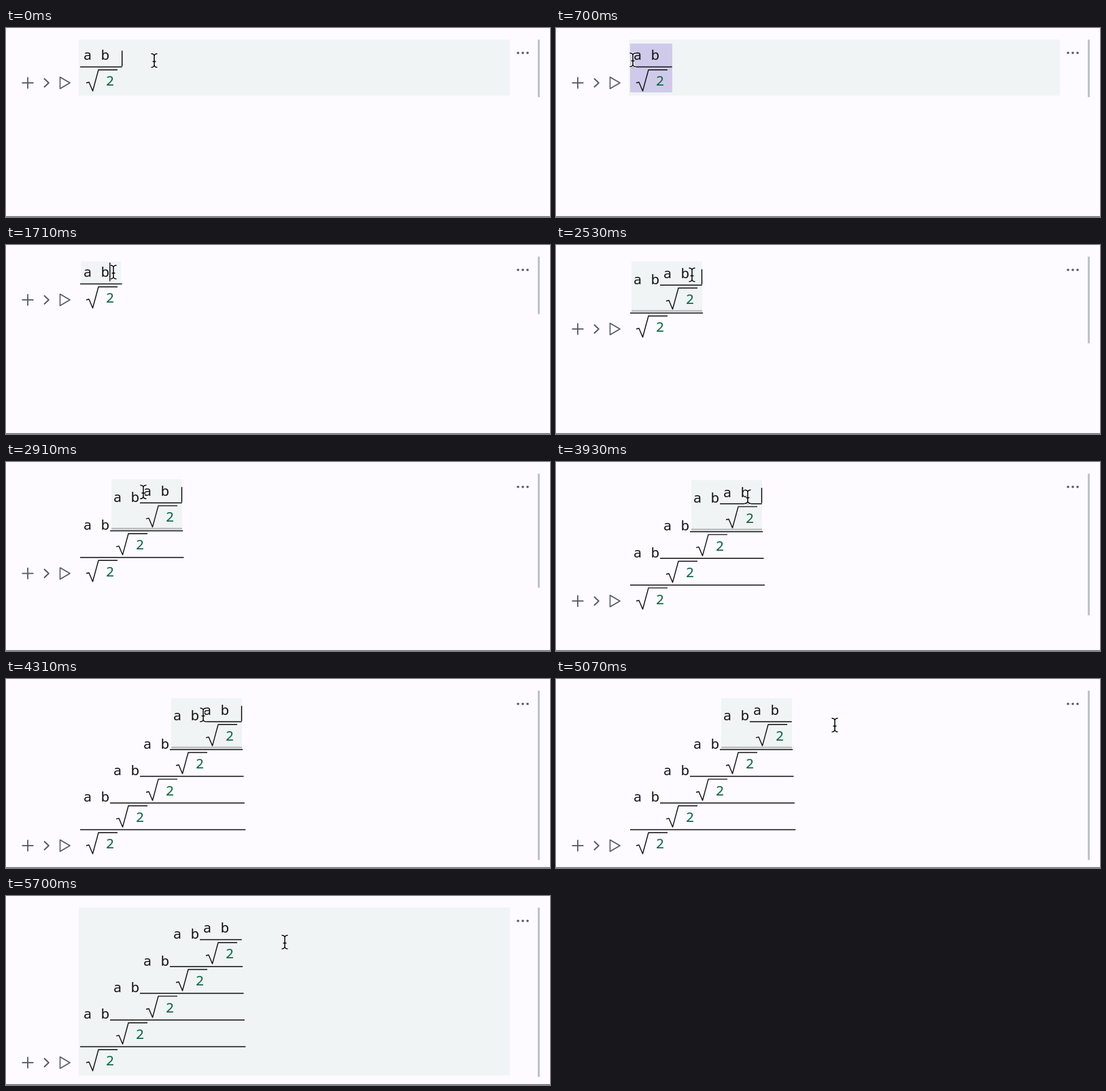
An HTML page with a canvas that plays this animation: 800 by 279 pixels, repeating every 5.82 s.

```html
<!DOCTYPE html>
<html lang="en">
<head>
<meta charset="utf-8">
<title>Nested fraction</title>
<style>
  html, body { margin: 0; width: 100%; height: 100%; overflow: hidden; background: #fdfbff; }
  canvas { display: block; width: 800px; height: 279px; }
</style>
</head>
<body>
<canvas id="stage"></canvas>
<script>
const LOOP = 5820, WIDTH = 800, HEIGHT = 279;
const LEFT = 109, INDENT = 44;
const INK = '#111', GREEN = '#0d6640', GREY = '#565b5d', CELL = '#f0f4f4';

const canvas = document.getElementById('stage');
const ctx = canvas.getContext('2d');
const scale = window.devicePixelRatio || 1;
canvas.width = WIDTH * scale;
canvas.height = HEIGHT * scale;

// [start, depth of nesting, focus]
const STATES = [
  [0, 1, 'cell'], [510, 1, 'selected'], [1270, 1, 'cell'], [1640, 1, 'slot'],
  [2030, 2, 'pasted'], [2690, 2, 'slot'], [2850, 3, 'pasted'], [3360, 3, 'slot'],
  [3550, 4, 'pasted'], [4060, 4, 'slot'], [4240, 5, 'pasted'], [5100, 5, 'cell'],
];

// Pointer path: [time, x, y]
const POINTER = [
  [0, 218, 48], [130, 218, 48], [680, 113, 47], [880, 113, 47], [1300, 164, 74],
  [1390, 162, 73], [1680, 158, 40], [2090, 158, 40], [2500, 200, 44], [2850, 200, 44],
  [3330, 243, 47], [3600, 243, 47], [4040, 289, 52], [4310, 290, 53], [4430, 290, 53],
  [4750, 410, 68], [LOOP, 410, 68],
];

const BOTTOM_BAR = [57.5, 100.5, 141, 181.7, 222.5];
const INNER_GAP = { cell: 39.8, selected: 39.8, slot: 40, pasted: 41.2 };

function rect(left, top, right, bottom, color) {
  ctx.fillStyle = color;
  ctx.fillRect(left, top, right - left, bottom - top);
}

function path(points, color, width, closed) {
  ctx.beginPath();
  points.forEach(([x, y]) => ctx.lineTo(x, y));
  if (closed) ctx.closePath();
  ctx.strokeStyle = color;
  ctx.lineWidth = width;
  ctx.stroke();
}

function glyph(char, x, baseline, color = INK) {
  ctx.fillStyle = color;
  ctx.fillText(char, x, baseline);
}

function caret(x, top, bottom) {
  rect(x - 0.7, top, x + 0.7, bottom, '#000');
}

function pointerAt(t) {
  const i = POINTER.findIndex(key => key[0] > t);
  const [t0, x0, y0] = POINTER[i - 1], [t1, x1, y1] = POINTER[i];
  const u = (t - t0) / (t1 - t0), eased = u * u * (3 - 2 * u);
  return [x0 + (x1 - x0) * eased, y0 + (y1 - y0) * eased];
}

// Heights of the fraction bars, outermost first.
function barHeights(depth, focus) {
  const bars = [BOTTOM_BAR[depth - 1] - (focus === 'slot' && depth > 1 ? 1.5 : 0)];
  for (let k = 1; k < depth; k++) {
    bars.push(bars[k - 1] - (k === depth - 1 ? INNER_GAP[focus] : 39.4));
  }
  return bars;
}

function drawFraction(bars) {
  const last = bars.length - 1;
  const innerRight = LEFT + INDENT * last + 61.7;
  bars.forEach((bar, k) => {
    const x = LEFT + INDENT * k;
    const baseline = k === last ? bar - 10.2 : bars[k + 1] - 1.8;
    glyph('a', x + 11, baseline);
    glyph('b', x + 37, baseline);
    rect(x, bar - 0.8, innerRight + 1.4 * (last - k), bar + 0.7, INK);
    path([[x + 9, bar + 23.5], [x + 13, bar + 22.5], [x + 18.5, bar + 35.5],
          [x + 27, bar + 4.2], [x + 55, bar + 4.2]], INK, 1.4);
    glyph('2', x + 44, bar + 27.8, GREEN);
  });
}

function drawFocus(bars, focus) {
  const last = bars.length - 1, inner = bars[last], outer = bars[0];
  const x = LEFT + INDENT * last;
  if (focus === 'cell' || focus === 'selected') rect(107, 17, 741, outer + 42.2, CELL);
  if (focus === 'selected') rect(LEFT, 23, 171, 95, '#cfcaea');
  if (focus === 'slot') rect(x + 1.5, inner - 33.2, x + 60, inner - 1, CELL);
  if (focus === 'pasted') {
    const floor = bars[last - 1] - 2;
    rect(x - 42, inner - 35, x + 62, floor, CELL);
    rect(x - 42, floor - 2.5, x + 62, floor, '#b9bebf');
  }
}

function drawCaret(t, bars, focus) {
  const last = bars.length - 1, inner = bars[last], x = LEFT + INDENT * last;
  if (focus === 'slot') caret(x + 43.8, inner - 31.5, inner - 4);
  if (focus === 'pasted' && t < 4690) caret(x + 61.5, inner - 23.5, inner - 1);
  if (focus === 'cell' && t < 5700) {
    caret(x + 61.7 + 1.4 * last - (last ? 0.4 : 0), bars[0] - 24, bars[0] - 1);
  }
}

function drawChrome(outer, shift) {
  const y = outer + 23.5;
  path([[23.5, y], [40.5, y]], GREY, 1.8);
  path([[32, y - 8.5], [32, y + 8.5]], GREY, 1.8);
  path([[56, y - 6.5], [62.8, y], [56, y + 6.5]], GREY, 1.9);
  path([[79.5, y - 8.5], [94, y], [79.5, y + 8.5]], GREY, 1.6, true);
  ctx.fillStyle = GREY;
  for (const x of [753, 760, 767]) {
    ctx.beginPath();
    ctx.arc(x, 36.7 - shift, 1.8, 0, 2 * Math.PI);
    ctx.fill();
  }
  rect(782, 17.2 - shift, 785, outer + 44.6, '#bdc3c6');
  rect(0, 277.8, WIDTH, HEIGHT, '#66686a');
}

function drawPointer(x, y) {
  ctx.save();
  ctx.translate(x, y);
  const beam = new Path2D(
    'M-4.5-10 Q-0.5-10 0-7 Q0.5-10 4.5-10 M0-7 V7 M-4.5 10 Q-0.5 10 0 7 Q0.5 10 4.5 10 M-2.5 1.5 H2.5');
  for (const [color, width] of [['#fff', 3.6], ['#000', 1.5]]) {
    ctx.strokeStyle = color;
    ctx.lineWidth = width;
    ctx.stroke(beam);
  }
  ctx.restore();
}

function draw(t) {
  const [, depth, focus] = STATES.filter(state => state[0] <= t).pop();
  const bars = barHeights(depth, focus);
  ctx.setTransform(scale, 0, 0, scale, 0, 0);
  ctx.font = '20.5px "Noto Sans Mono", "DejaVu Sans Mono", monospace';
  ctx.textAlign = 'center';
  ctx.lineJoin = 'round';
  rect(0, 0, WIDTH, HEIGHT, '#fdfbff');
  drawFocus(bars, focus);
  drawFraction(bars);
  drawCaret(t, bars, focus);
  drawChrome(bars[0], focus === 'slot' && depth > 1 ? 1.5 : 0);
  drawPointer(...pointerAt(t));
}

const start = performance.now();
function tick() {
  draw((performance.now() - start) % LOOP);
  requestAnimationFrame(tick);
}
tick();
</script>
</body>
</html>
```
